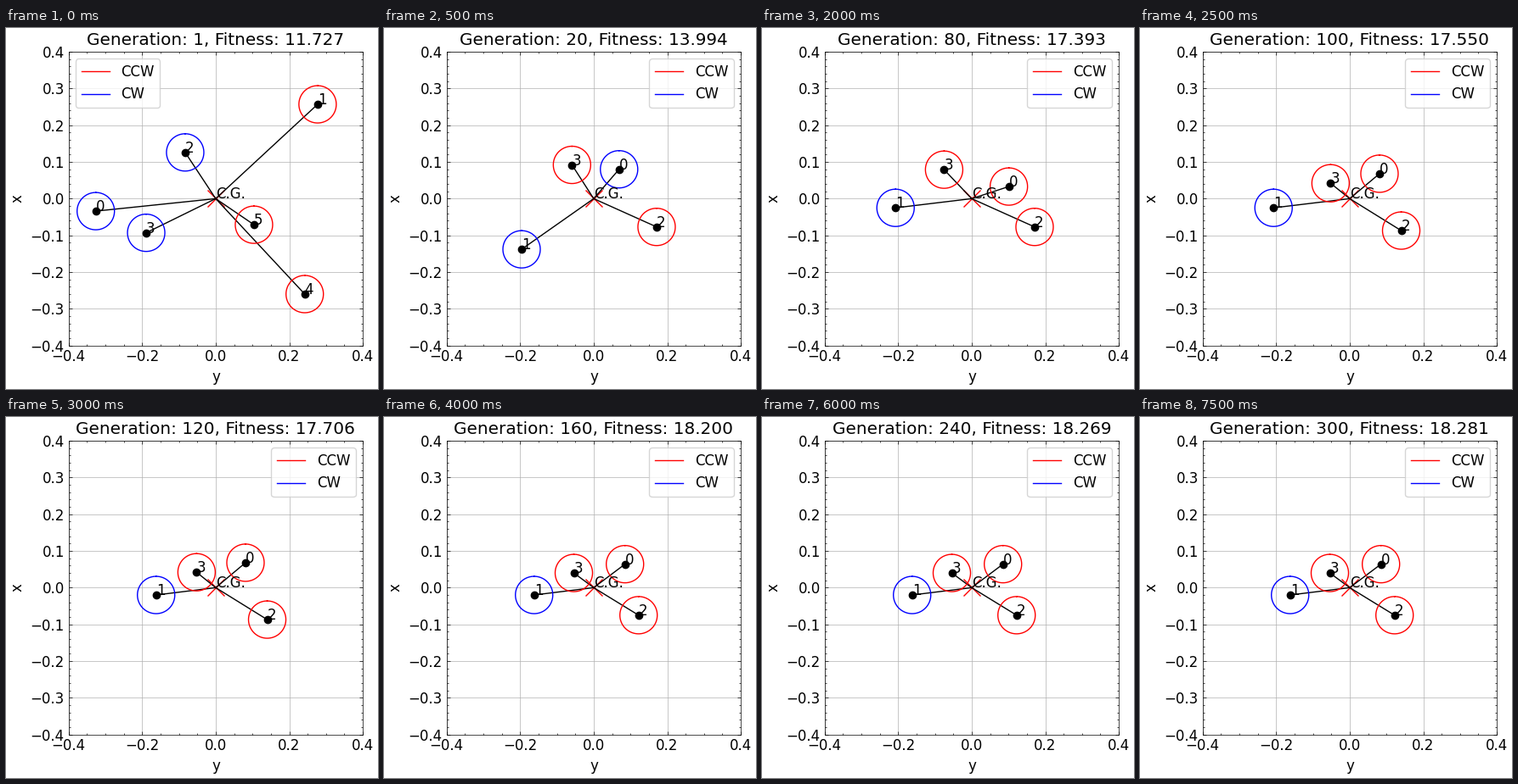
A matplotlib script that plays this animation: 438x426 px, repeating every 8 s.

```python
import numpy as np
import matplotlib.pyplot as plt
from matplotlib.animation import FuncAnimation
from matplotlib.ticker import AutoMinorLocator, MultipleLocator

W, H, DPI = 438, 426, 100
LEFT, BOTTOM, SIDE = 73.65, 51.37, 346.5
STEPS = 16
RADIUS = 0.0508

for axis in ("xtick", "ytick"):
    plt.rcParams.update({
        f"{axis}.direction": "in",
        f"{axis}.major.width": 0.5, f"{axis}.minor.width": 0.5,
        f"{axis}.major.size": 3, f"{axis}.minor.size": 1.5,
    })
plt.rcParams.update({
    "font.family": "DejaVu Sans", "font.size": 12,
    "xtick.top": True, "ytick.right": True,
    "axes.linewidth": 0.5, "grid.linewidth": 0.5, "lines.linewidth": 1.0,
})

# Best fitness at key steps, interpolated between them
FITNESS = {0: 11.727, 2: 16.260, 4: 17.393, 6: 17.706, 8: 18.200,
           12: 18.269, 13: 18.279, 14: 18.279, 15: 18.281}

# First design has six rotors
START = [(-.326, -.034), (.277, .257), (-.083, .126),
         (-.189, -.093), (.242, -.260), (.104, -.071)]

# Later designs have four; each rotor holds its place until its next key step
TRACKS = [
    {1: (.069, .080), 3: (.101, .033), 5: (.081, .068), 8: (.085, .064)},
    {1: (-.196, -.138), 2: (-.169, -.121), 3: (-.207, -.025),
     6: (-.162, -.020)},
    {1: (.171, -.077), 5: (.140, -.087), 7: (.122, -.075)},
    {1: (-.059, .092), 4: (-.075, .079), 5: (-.052, .042), 8: (-.054, .040)},
]

fig = plt.figure(figsize=(W / DPI, H / DPI), dpi=DPI, facecolor="white")
ax = fig.add_axes([LEFT / W, BOTTOM / H, SIDE / W, SIDE / H])
angle = np.linspace(0, 2 * np.pi, 100)


def design(step):
    """Rotor centres and the indices of the clockwise rotors."""
    if step == 0:
        return START, {0, 2, 3}
    centres = [track[max(k for k in track if k <= step)] for track in TRACKS]
    return centres, {0, 1} if step < 3 else {1}


def setup_axes():
    ax.clear()
    ax.set(xlim=(-.4, .4), ylim=(-.4, .4), xlabel="y", ylabel="x")
    for axis, spacing in ((ax.xaxis, 0.2), (ax.yaxis, 0.1)):
        axis.set_major_locator(MultipleLocator(spacing))
        axis.set_minor_locator(AutoMinorLocator())
    ax.grid(True)


def draw_rotor(index, x, y, color):
    ax.plot([0, x], [0, y], "k-")
    ax.plot(x, y, "ko")
    ax.plot(x + RADIUS * np.sin(angle), y + RADIUS * np.cos(angle), color=color)
    ax.text(x, y, str(index))


def update(step):
    setup_axes()
    ax.plot(0, 0, "rx", markersize=14)
    ax.text(0, 0, "C.G.")
    centres, clockwise = design(step)
    for i, (x, y) in enumerate(centres):
        draw_rotor(i, x, y, "b" if i in clockwise else "r")

    ax.plot([], [], "r-", label="CCW")
    ax.plot([], [], "b-", label="CW")
    ax.legend(loc="upper right" if step else "upper left")
    fitness = np.interp(step, list(FITNESS), list(FITNESS.values()))
    ax.set_title(f"Generation: {max(1, 20 * step)}, Fitness: {fitness:.3f}")
    return []


anim = FuncAnimation(fig, update, frames=STEPS, interval=500,
                     init_func=lambda: [], repeat=True, repeat_delay=0)
plt.show()
```
